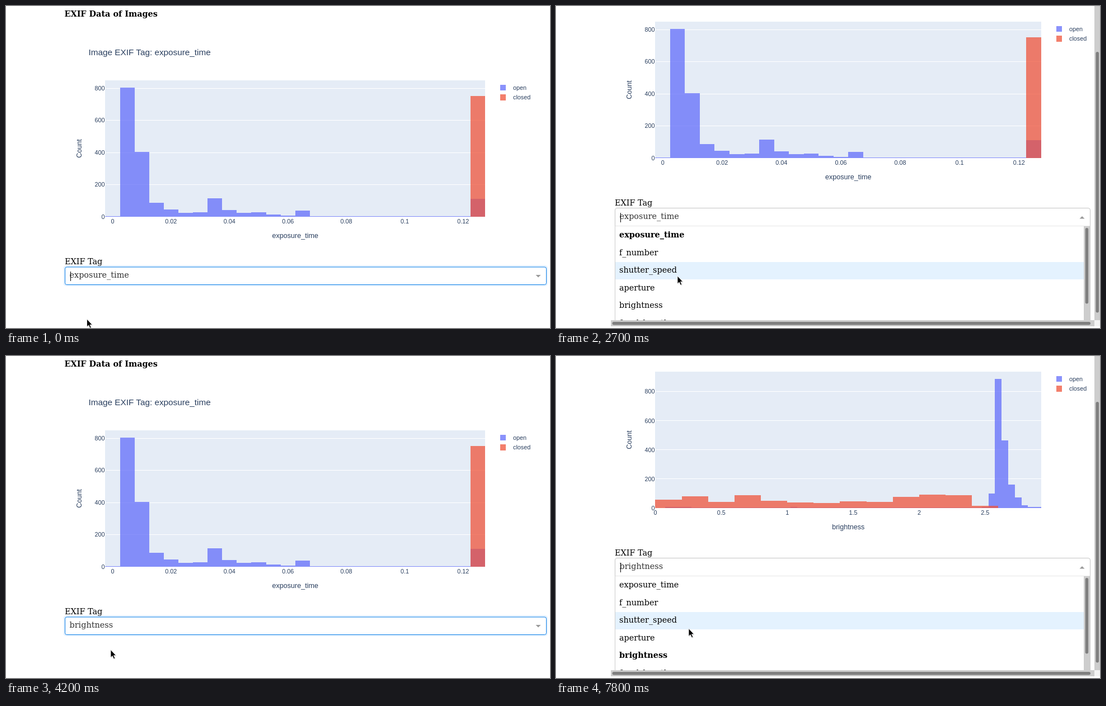
These frames come from a looping animation (972x576 px, 8 s). An HTML page:

```html
<!DOCTYPE html>
<html lang="en">
<head>
<meta charset="utf-8">
<title>EXIF Data of Images</title>
<style>
  html, body { margin: 0; width: 100%; height: 100%; overflow: hidden; background: #fff; }
  svg { display: block; font: 14.4px "DejaVu Serif", serif; }
  .chart { font: 10.8px "Liberation Sans", Arial, sans-serif; fill: #2a3f5f; }
  .chart rect, .chart line { shape-rendering: crispEdges; }
  .bold { font-weight: bold; }
</style>
</head>
<body>
<svg id="stage" width="972" height="576" viewBox="0 0 972 576"></svg>
<script>
const LOOP = 8000, STEP = 100, SCROLL = 105;
const LEFT = 177.4, BASE = 377, TOP = 133;
const MENU_TOP = 394.9, ROW = 31.55;
const OPEN = '#636efa', CLOSED = '#ef553b';
const OPTIONS = ['exposure_time', 'f_number', 'shutter_speed', 'aperture', 'brightness', 'focal_length'];

// Bin counts for each tag; `start` and `size` are in axis units.
const CHARTS = {
  exposure_time: {
    min: -0.0025, max: 0.1275, tick: 0.02, perCount: 0.2875,
    series: [
      { color: OPEN, start: -0.0025, size: 0.005,
        counts: [5, 805, 405, 88, 46, 24, 27, 115, 43, 24, 27, 14, 8, 37, 5, ...Array(10).fill(2), 112] },
      { color: CLOSED, start: 0.1225, size: 0.005, counts: [750] }
    ]
  },
  brightness: {
    min: 0, max: 2.925, tick: 0.5, perCount: 0.2606,
    series: [
      { color: OPEN, start: 0.075, size: 0.05,
        counts: [6, 6, 6, 6, ...Array(15).fill(3), 6, ...Array(28).fill(3), 7, 101, 887, 464, 162, 72, 20, 9, 6] },
      { color: CLOSED, start: 0, size: 0.2,
        counts: [58, 82, 42, 90, 48, 38, 34, 46, 42, 77, 94, 90, 15] }
    ]
  }
};

// Pointer path: time, x, y
const PATH = [
  [0, 144.5, 560], [300, 144.5, 560], [600, 180, 523], [1800, 180, 523],
  [2400, 217, 483], [3400, 217, 483], [4000, 187, 525.5], [6900, 187, 525.5],
  [7000, 193, 523.5], [7600, 237, 487.5], [LOOP, 237, 487.5]
];

const rect = (x, y, w, h, fill, extra = '') =>
  `<rect x="${x}" y="${y}" width="${w}" height="${h}" fill="${fill}" ${extra}/>`;
const text = (x, y, str, extra = '') => `<text x="${x}" y="${y}" ${extra}>${str}</text>`;
const shape = (d, fill, extra = '') => `<path d="${d}" fill="${fill}" ${extra}/>`;

function pointerAt(time) {
  const i = PATH.findIndex(key => key[0] > time);
  const [t0, x0, y0] = PATH[i - 1], [t1, x1, y1] = PATH[i];
  const k = (time - t0) / (t1 - t0);
  return [x0 + (x1 - x0) * k, y0 + (y1 - y0) * k];
}

function drawChart(tag, wide) {
  const { min, max, tick, perCount, series } = CHARTS[tag];
  const right = wide ? 867 : 856, width = right - LEFT;
  const toX = v => LEFT + (v - min) / (max - min) * width;
  const toY = n => BASE - n * perCount;
  let out = rect(LEFT, TOP, width, BASE - TOP, '#e5ecf6');

  for (let n = 0; n <= 800; n += 200) {
    const y = toY(n);
    if (n) out += `<line x1="${LEFT}" x2="${right}" y1="${y}" y2="${y}" stroke="#fff"/>`;
    out += text(176.4, y + 3.9, n, 'text-anchor="end"');
  }
  for (const { color, start, size, counts } of series) {
    counts.forEach((n, i) => {
      const x = toX(start + i * size);
      out += rect(x, toY(n), toX(start + (i + 1) * size) - x, n * perCount, color, 'opacity=".75"');
    });
  }
  for (let i = 0; i * tick < max; i++) {
    out += text(toX(i * tick), 389, +(i * tick).toFixed(2), 'text-anchor="middle"');
  }
  [['open', OPEN], ['closed', CLOSED]].forEach(([name, color], i) => {
    out += rect(right + 26.6, 140.6 + i * 17.2, 10.8, 10.8, color, 'opacity=".75"');
    out += text(right + 50, 150 + i * 17.2, name);
  });
  out += text(wide ? 148 : 147.5, 88, 'Image EXIF Tag: ' + tag, 'font-size="15.3"');
  out += text(LEFT + width / 2, 415, tag, 'font-size="12.6" text-anchor="middle"');
  out += text(0, 0, 'Count', 'font-size="12.6" text-anchor="middle" transform="translate(134.5 255)rotate(-90)"');
  return `<g class="chart">${out}</g>`;
}

function drawSelect(value, open, caret) {
  let out = text(105, 462, 'EXIF Tag');
  if (open) {
    out += shape('M105.5 499V470q0-3.5 3.5-3.5H951q3.5 0 3.5 3.5V499', '#fff', 'stroke="#c4c4c4"');
    out += shape('M935.5 485.5h9l-4.5-4.5z', '#999');
  } else {
    out += rect(102.3, 463.8, 866, 37.4, '#007eff', 'rx="6" opacity=".1"');
    out += rect(105.5, 467, 860, 31.5, '#fff', 'rx="3.2" stroke="#0f80e6"');
    out += shape('M946.5 481h9l-4.5 4.5z', '#999');
  }
  out += text(113.5, 486, value, 'fill="#333"');
  if (caret) out += rect(115, 475, 1, 17, '#000');
  return out;
}

function drawMenu(value, hover, wide) {
  let out = rect(105.5, 393.5, 849, 190, '#fff', 'stroke="#ccc"') + rect(106, 393, 848, 1, '#e6e6e6');
  OPTIONS.forEach((name, i) => {
    const y = MENU_TOP + i * ROW;
    if (i === hover) out += rect(106, Math.round(y), 837, 31, '#e4f2fe');
    out += text(113, Math.round(y + 19.2), name, name === value ? 'class="bold"' : '');
  });
  const track = '#cdcdcd', thumb = '#7f7f7f', round = 'rx="2.75"';
  out += rect(943, 394, 11, 180, track) + rect(945.7, 397, 5.5, 135.5, thumb, round);
  out += rect(962, 0, 10, 573, track);
  out += wide ? rect(964.5, 82, 5.5, 466.5, thumb, round) : rect(964.5, 84, 5.5, 486, thumb, round);
  if (wide) {
    out += rect(98, 562, 864, 11, track) + rect(962, 562, 10, 11, '#f3f3f3');
    out += rect(100.5, 565, 854.5, 5.5, thumb, round);
  }
  return out + rect(0, 573, 972, 3, '#fff');
}

function drawPointer(x, y, beam) {
  const ibeam = 'M-3.5-7.5H-1L0-6.5 1-7.5H3.5M0-6.5V6.5M-3.5 7.5H-1L0 6.5 1 7.5H3.5';
  const arrow = 'M0 0V13.8L3.2 11 5.5 16.2 7.8 15.2 5.5 10.2H9.6Z';
  const art = beam
    ? shape(ibeam, 'none', 'stroke="#fff" stroke-width="3"') + shape(ibeam, 'none', 'stroke="#222" stroke-width="1.2"')
    : shape(arrow, '#000', 'opacity=".15" transform="translate(1 1)"') +
      shape(arrow, '#000', 'stroke="#fff" stroke-width=".8"');
  return `<g transform="translate(${x} ${y})">${art}</g>`;
}

function scene(time) {
  const open = time >= 2700 && time < 4200 || time >= 7800;
  const wide = time >= 100 && time < 2800 || time >= 4500;
  const caret = time < 1200 || time >= 1900 && time < 3500 || time >= 7800;
  const value = time < 4200 ? 'exposure_time' : 'brightness';
  const plotted = time < 4300 ? 'exposure_time' : 'brightness';
  const [x, y] = pointerAt(time);
  const page = text(104.5, 19, 'EXIF Data of Images', 'class="bold"') +
    drawChart(plotted, wide) + drawSelect(value, open, caret);
  return `<g transform="translate(0 ${open ? -SCROLL : 0})">${page}</g>` +
    (open ? drawMenu(value, Math.floor((y - MENU_TOP) / ROW), wide) : '') +
    drawPointer(x, y, !open && y > 466 && y < 499);
}

const stage = document.getElementById('stage');
let shown = -1;
function render() {
  const time = Math.floor(performance.now() % LOOP / STEP) * STEP;
  if (time !== shown) stage.innerHTML = scene(shown = time);
  requestAnimationFrame(render);
}
render();
</script>
</body>
</html>
```
